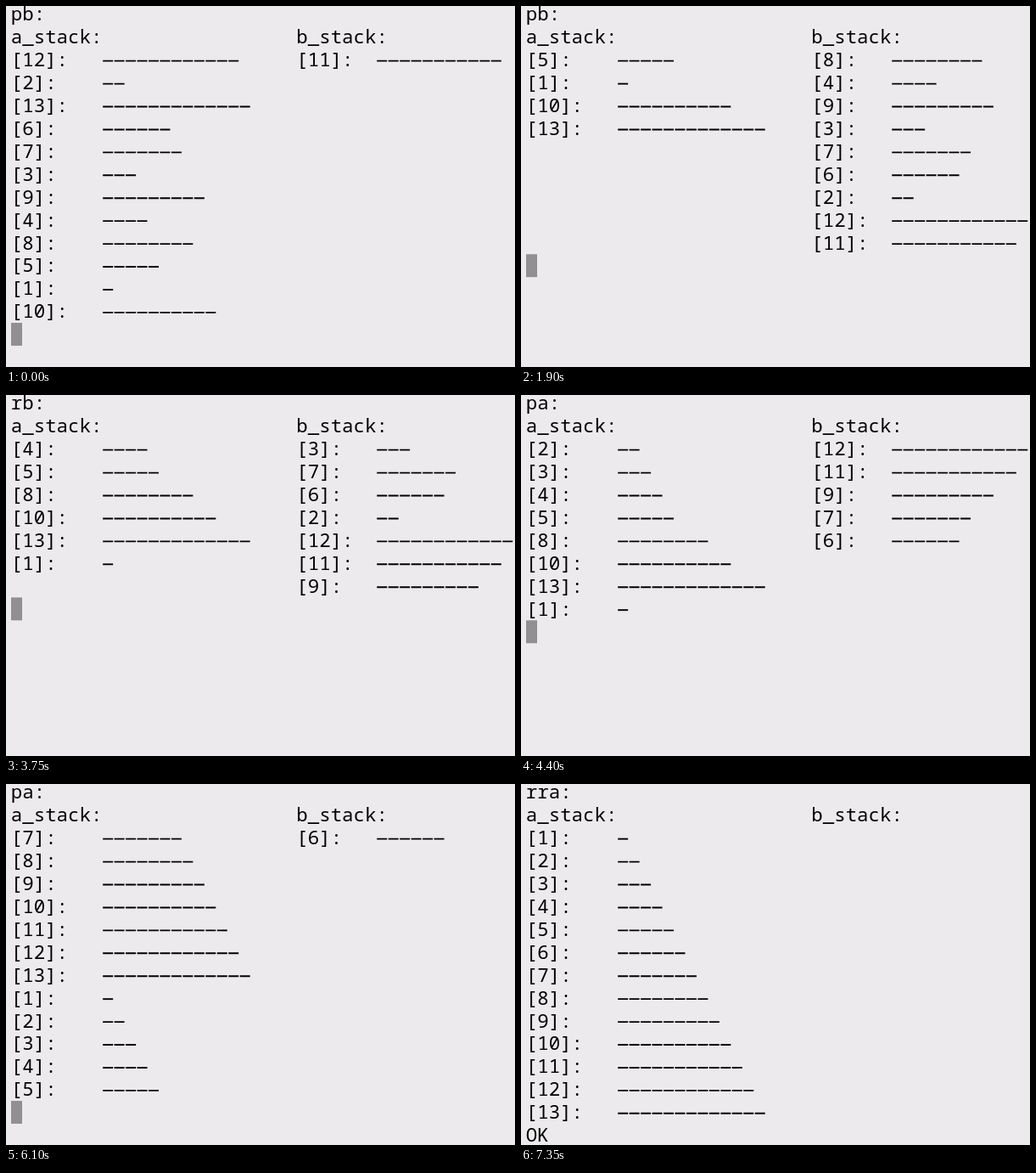
Write an HTML page that moves like this. It is 600x425 px and loops after 9050 ms.

```html
<!DOCTYPE html>
<html lang="en">
<head>
<meta charset="utf-8">
<title>Sorting with two stacks</title>
<style>
  html, body { margin: 0; width: 100%; height: 100%; overflow: hidden; background: #eceaec; }
  svg { display: block; width: 100%; height: 100%; }
  text { font: 500 22.43px "Noto Sans Mono", "DejaVu Sans Mono", monospace; fill: #000; }
  line { stroke: #000; stroke-width: 1.9; stroke-dasharray: 12 1.46; }
  rect { fill: #918f91; }
</style>
</head>
<body>
<svg id="screen" viewBox="0 0 600 425"></svg>
<script>
const LOOP = 9050;
const LEFT = 5.8, TOP = -4, CELL = 13.46, LINE = 26.93;
const OPS = ('pb pb ra pb pb pb pb pb pb pb ra pa ra pa rra pa rb pa rb rb pa ' +
  'rra rra pa pa rra pa rra pa pa rra rra rra rra rra').split(' ');

const operations = {
  pa: (a, b) => a.unshift(b.shift()),
  pb: (a, b) => b.unshift(a.shift()),
  ra: a => a.push(a.shift()),
  rb: (a, b) => b.push(b.shift()),
  rra: a => a.unshift(a.pop())
};

const x = col => LEFT + col * CELL;
const y = row => TOP + row * LINE;

const text = (col, row, string) =>
  `<text x="${x(col)}" y="${y(row) + 21.2}">${string}</text>`;

function bar(col, row, count) {
  const start = x(col) + 0.7, middle = y(row) + 14.8;
  return `<line x1="${start}" x2="${start + count * CELL - 1.46}" y1="${middle}" y2="${middle}"/>`;
}

const stack = (name, values, labelCol, barCol) =>
  text(labelCol, 1, name + '_stack:') +
  values.map((n, i) => text(labelCol, i + 2, `[${n}]:`) + bar(barCol, i + 2, n)).join('');

function picture(op, a, b, done) {
  const end = 2 + Math.max(a.length, b.length);
  const prompt = done
    ? text(0, end, 'OK')
    : `<rect x="6" y="${y(end)}" width="13" height="${LINE}"/>`;
  return text(0, 0, op + ':') + stack('a', a, 0, 8) + stack('b', b, 25, 32) + prompt;
}

const a = [12, 2, 13, 6, 7, 3, 9, 4, 8, 5, 1, 10], b = [11];
const pictures = [picture('pb', a, b, false)];
OPS.forEach((op, i) => {
  operations[op](a, b);
  pictures.push(picture(op, a, b, i === OPS.length - 1));
});

// A step takes 210 ms, snapped to a 50 ms clock.
const startOf = step => Math.round(step * 4.2) * 50;

const screen = document.getElementById('screen');
let shown = -1;

function draw() {
  const time = performance.now() % LOOP;
  let step = OPS.length;
  while (startOf(step) > time) step--;
  if (step !== shown) screen.innerHTML = pictures[shown = step];
  requestAnimationFrame(draw);
}
draw();
</script>
</body>
</html>
```
